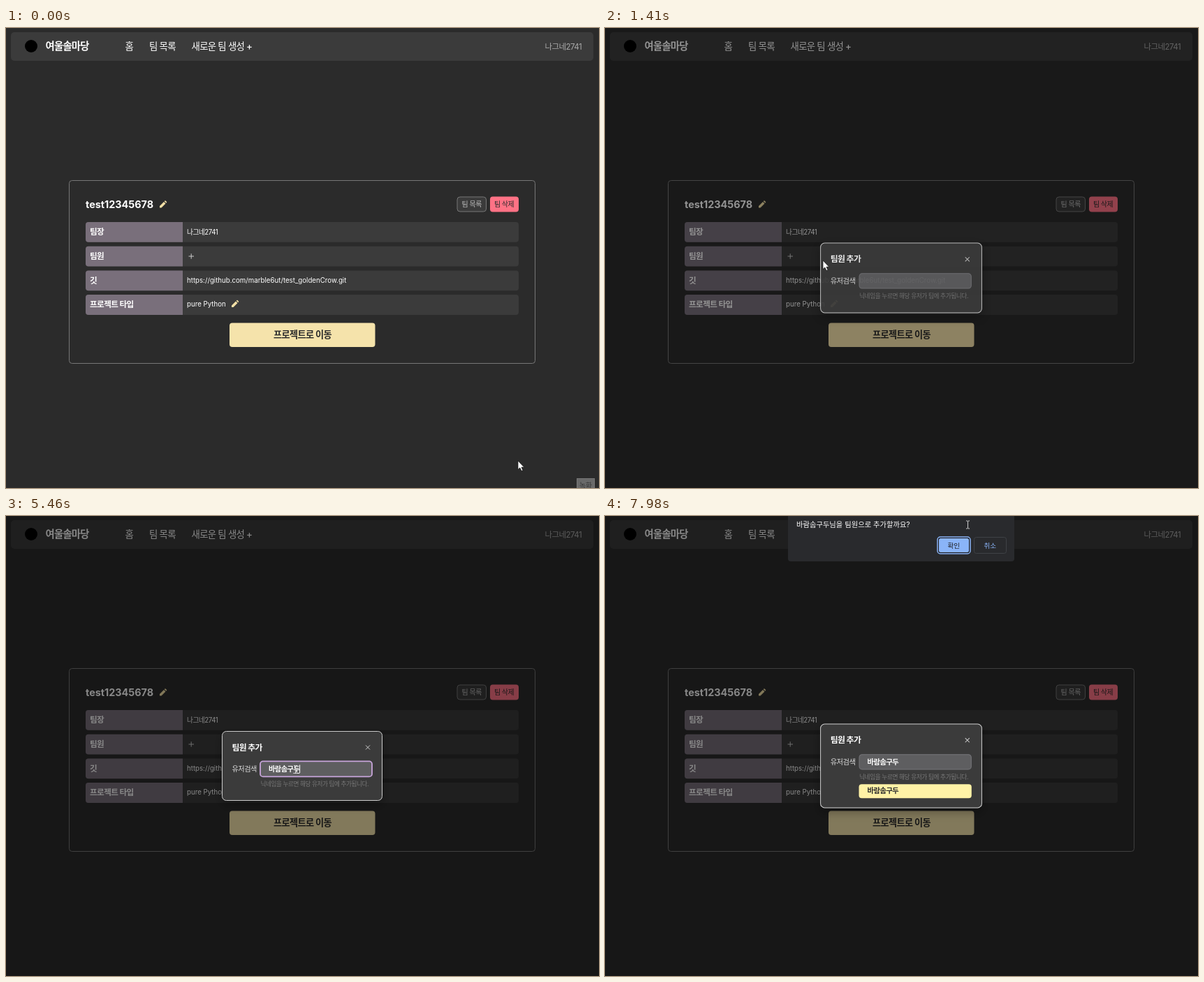
These frames come from a looping animation (849x659 px, 8 s). An HTML page:

```html
<!DOCTYPE html>
<html lang="ko">
<head>
<meta charset="utf-8">
<style>
html, body { margin: 0; height: 100%; overflow: hidden; background: #2b2b2b; }
svg { display: block; width: 849px; height: 659px; font-family: Inter, "Noto Sans CJK KR", "Noto Sans CJK", sans-serif; fill: #fff; }
.ko { letter-spacing: -.05em; }
.b { font-weight: 700; }
.m { font-weight: 500; }
.dark { fill: #2b2b2b; }
.nav { font-size: 13.4px; font-weight: 500; }
.label { font-size: 11.6px; font-weight: 700; }
.value { font-size: 9.7px; }
.small { font-size: 10px; }
.line { fill: none; stroke: #ccc; }
</style>
</head>
<body>
<svg viewBox="0 0 849 659">
  <defs>
    <g id="pencil" fill="#f3e0a6"><path d="M0 10V7.5L6 1.5 8.5 4 2.5 10Z M6.7 .8 7.5 0Q8 -.4 8.5 0L10 1.5Q10.4 2 10 2.5L9.2 3.3Z"/></g>
    <filter id="shadow" x="-20%" y="-30%" width="140%" height="170%">
      <feDropShadow dx="0" dy="6" stdDeviation="7" flood-opacity=".3"/>
    </filter>
  </defs>
  <rect width="849" height="659" fill="#2b2b2b"/>

  <rect x="7" y="6" width="834" height="41" rx="5" fill="#3b3b3b"/>
  <circle cx="36" cy="26" r="9" fill="#000"/>
  <text class="ko b" x="56.5" y="31" font-size="14.3">여울솔마당</text>
  <g class="ko nav">
    <text x="170.5" y="30.5">홈</text>
    <text x="205" y="30.5">팀 목록</text>
    <text x="265.5" y="30.5">새로운 팀 생성 +</text>
  </g>
  <text class="ko" x="824" y="30.5" font-size="11.5" fill="#aaa" text-anchor="end">나그네2741</text>

  <rect x="90.5" y="218.5" width="667" height="262" rx="4" fill="none" stroke="#777"/>
  <text class="b" x="114" y="257.5" font-size="14.4">test12345678</text>
  <use href="#pencil" x="220" y="247.5"/>
  <rect x="646" y="242" width="41.5" height="21" rx="4" fill="#3b3b3b" stroke="#777"/>
  <text class="ko small" x="652.5" y="256" fill="#bbb">팀 목록</text>
  <rect x="693" y="241.5" width="41" height="22" rx="4" fill="#ff7285"/>
  <text class="ko small m dark" x="699" y="256">팀 삭제</text>

  <g id="rows"></g>
  <path class="line" d="M261.5 327H269M265.2 323.3V330.7"/>
  <use href="#pencil" x="323" y="390"/>
  <rect x="320" y="422.5" width="208.5" height="34.5" rx="4" fill="#f5e3ab"/>
  <text class="ko dark" x="383" y="444" font-size="13.2" font-weight="600">프로젝트로 이동</text>

  <g id="tip">
    <rect x="817.5" y="645.5" width="25" height="16" fill="#696969" stroke="#777"/>
    <text class="ko" x="821" y="658.5" font-size="10" fill="#333">녹화</text>
  </g>
  <rect id="shade" width="849" height="659" fill="#000"/>

  <g id="modal">
    <rect id="box" x="309.5" y=".5" width="229" rx="6" fill="#3b3b3b" stroke="#ccc" filter="url(#shadow)"/>
    <text class="ko b" x="323.5" y="27.5" font-size="11.8">팀원 추가</text>
    <path class="line" d="M515 20.5 521 26.5M521 20.5 515 26.5"/>
    <text class="ko" x="323.5" y="58" font-size="10.2" fill="#ddd">유저검색</text>
    <rect id="field" fill="#5e5e60"/>
    <text id="typed" class="ko" x="376" y="58.3" font-size="10.2" font-weight="600"></text>
    <path id="under" stroke="#fff"/>
    <path id="caret" stroke="#fff"/>
    <text class="ko" x="364.5" y="78.8" font-size="8.65" fill="#777">닉네임을 누르면 해당 유저가 팀에 추가됩니다.</text>
    <g id="result">
      <rect id="pick" x="364" y="86" width="160" height="20" rx="4" fill="#fff2a6"/>
      <text id="found" class="ko" x="376" y="98.5" font-size="10.2" font-weight="600"></text>
    </g>
  </g>

  <g id="dialog">
    <path d="M262 0H586V61Q586 65 582 65H266Q262 65 262 61Z" fill="#292a2d"/>
    <text id="ask" x="274" y="15.5" font-size="10.3"></text>
    <rect x="476" y="30" width="47" height="24" rx="4" fill="#202124" stroke="#8ab4f8" stroke-width="1.5"/>
    <rect x="478" y="32" width="43" height="20" rx="2.5" fill="#8ab4f8"/>
    <text x="490.5" y="45.5" font-size="9.6" fill="#202124">확인</text>
    <rect x="528.5" y="30.5" width="46" height="23" rx="3" fill="none" stroke="#3f4246"/>
    <text x="542.5" y="45.5" font-size="9.6" fill="#8ab4f8">취소</text>
  </g>

  <g id="cursor">
    <path id="arrow" d="M0 0V12.5L2.8 10 5 14.6 7 13.7 5 9.3H8.8Z" stroke="#111" stroke-width=".7"/>
    <path id="hand" d="M-1.5 1Q0 -1 1.3 1V6Q3 5 4 6.5 6 5.7 6.6 7.3 8.6 7 8.8 9V12Q8.6 14 7.5 15.5H.5Q-1 13-3.3 10.2-3.5 8-1.5 9.5Z" stroke="#111" stroke-width=".8"/>
    <path id="beam" d="M-2.5 -5.5H-.6L0 -5 .6 -5.5H2.5M0 -5V5M-2.5 5.5H-.6L0 5 .6 5.5H2.5" fill="none" stroke="#ccc"/>
  </g>
</svg>
<script>
const $ = id => document.getElementById(id);
const LOOP = 8000, NAME = '바람솜구두';

const rows = [['팀장', '나그네2741'], ['팀원', ''],
  ['깃', 'https://github.com/marble6ut/test_goldenCrow.git'], ['프로젝트 타입', 'pure Python']];
$('rows').innerHTML = rows.map(([label, value], i) => {
  const y = 278 + i * 34.7;
  return `<rect x="114" y="${y}" width="620" height="28.8" rx="4" fill="#3b3b3b"/>
    <path d="M253 ${y}v28.8H118q-4 0-4-4v-20.8q0-4 4-4Z" fill="#796f7b"/>
    <text class="ko label" x="120" y="${y + 18.2}">${label}</text>
    <text class="value ${i ? '' : 'ko'}" x="259" y="${y + (i == 3 ? 16.8 : 17.7)}">${value}</text>`;
}).join('');
$('found').textContent = NAME;
$('ask').textContent = NAME + '님을 팀원으로 추가할까요?';

const typing = [[0, ''], [2470, 'ㅂ'], [3020, '버'], [3110, '벌'], [3650, '버'], [3750, 'ㅂ'],
  [4020, '바'], [4200, '발'], [4380, '바라'], [4560, '바람'], [4740, '바람소'],
  [5010, '바람솜'], [5100, '바람솜구'], [5370, '바람솜굳'], [5460, NAME]];
// time, x, y of the pointer
const path = [[80, 733, 620], [850, 270, 326.5], [1030, 270, 326.5], [1410, 312, 333], [1670, 414.5, 363],
  [6720, 414.5, 363], [6800, 408.5, 382], [6890, 408.5, 382], [7080, 391, 403], [7540, 391, 403], [7970, 519.5, 12.5]];
const shapes = [[0, 'arrow'], [840, 'hand'], [1200, 'arrow'], [1600, 'beam'], [6730, 'arrow'],
  [6900, 'hand'], [7600, 'arrow'], [7930, 'beam']];

const last = (list, t) => list.filter(k => k[0] <= t).pop();
const ease = (t, a, b) => {
  const u = Math.min(1, Math.max(0, (t - a) / (b - a)));
  return u * u * (3 - 2 * u);
};
const show = (id, on) => $(id).style.display = on ? '' : 'none';
const set = (id, attrs) => { for (const k in attrs) $(id).setAttribute(k, attrs[k]); };

function pointer(t) {
  const from = last(path, t) || path[0];
  const to = path[path.indexOf(from) + 1] || from;
  const u = from == to ? 0 : ease(t, from[0], to[0]);
  return [1, 2].map(i => from[i] + (to[i] - from[i]) * u);
}

function draw(t) {
  const fade = ease(t, 1030, 1500);
  const focus = ease(t, 1900, 2220) * (1 - ease(t, 7080, 7350));
  const found = t >= 6000, hover = t >= 6900;
  const zoom = 1.008 - .008 * focus;
  show('tip', t < 80);
  set('shade', { opacity: .47 * fade });
  set('modal', { opacity: fade,
    transform: `translate(424 358) scale(${zoom}) translate(-424 ${found ? -60 : -50})` });
  set('box', { height: found ? 119 : 99 });
  const g = focus * .5;
  set('field', { x: 364.5 - g, y: 43.9 - g, width: 159 + 2 * g, height: 21 + 2 * g, rx: 4,
    stroke: focus > .4 ? '#c8a5db' : '#76767a', 'stroke-width': 1 + focus * .8 });

  const text = last(typing, t)[1], el = $('typed');
  if (el.textContent != text) el.textContent = text;
  const end = 376 + (text ? el.getComputedTextLength() : 0);
  const lastWidth = text ? el.getSubStringLength(text.length - 1, 1) : 0;
  set('caret', { d: `M${end + .3} 48.5V60` });
  set('under', { d: `M${end - lastWidth} 60.5H${end}` });
  show('caret', t >= 2130 && t < 6540);
  show('under', text && !found);

  show('result', found);
  show('pick', hover);
  set('found', { fill: hover ? '#2b2b2b' : '#f7dc5c' });
  show('dialog', t >= 7350);

  const [x, y] = pointer(t), shape = last(shapes, t)[1];
  set('cursor', { transform: `translate(${x} ${y})` });
  for (const id of ['arrow', 'hand', 'beam']) show(id, id == shape);
}

const start = performance.now();
function tick() {
  draw((performance.now() - start) % LOOP);
  requestAnimationFrame(tick);
}
tick();
</script>
</body>
</html>
```
